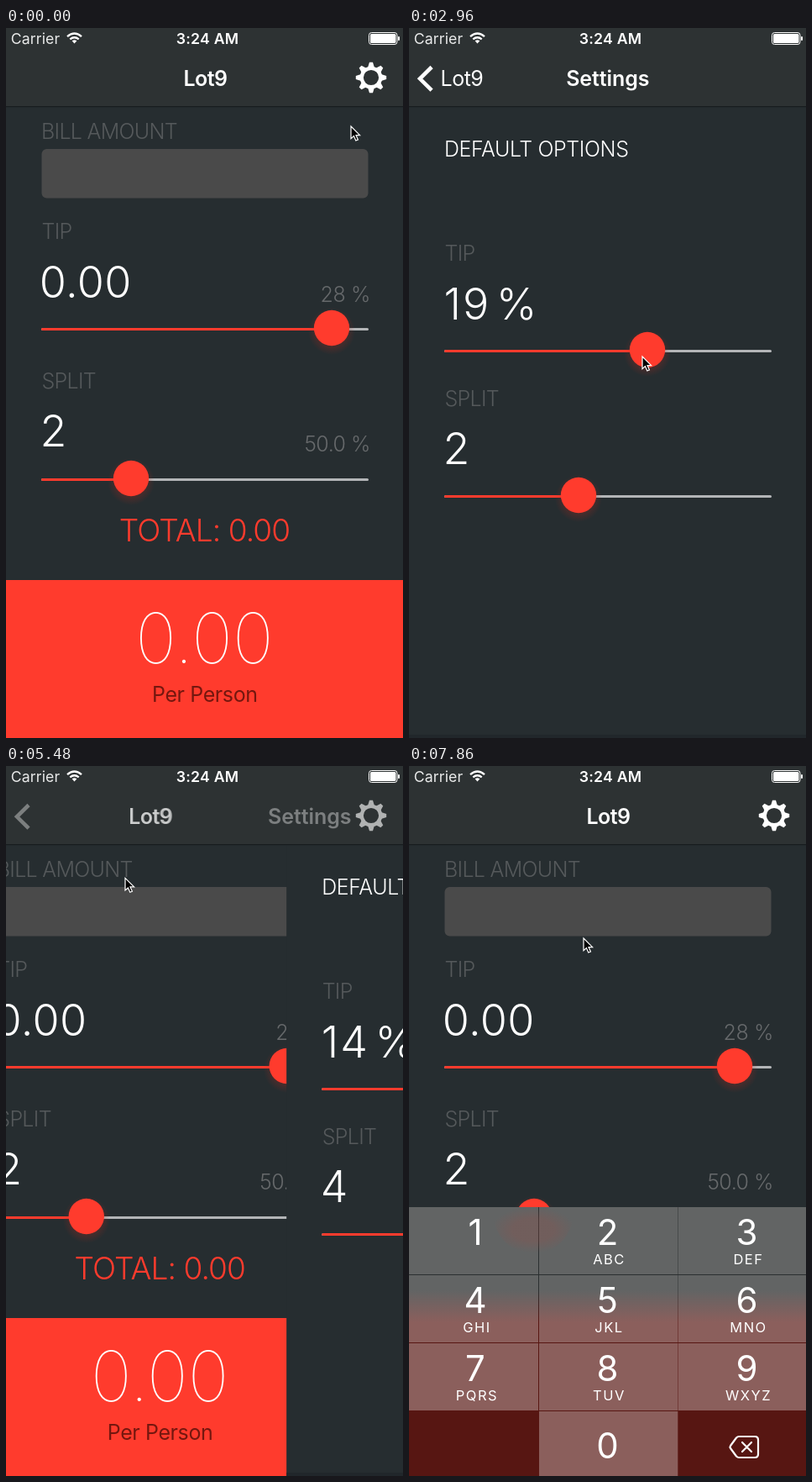
An HTML page for the animation above (8 s loop, 473 by 845 pixels).

```html
<!DOCTYPE html>
<html lang="en">
<head>
<meta charset="utf-8">
<title>Tip calculator</title>
<style>
  html, body { margin: 0; width: 100%; height: 100%; overflow: hidden; background: #262d30; }
  svg { display: block; width: 100%; height: 100%; }
  text { font-family: Inter, Roboto, sans-serif; white-space: pre; }
</style>
</head>
<body>
<svg id="stage" viewBox="0 0 473 845">
  <defs>
    <linearGradient id="key" gradientUnits="userSpaceOnUse" x1="0" y1="624" x2="0" y2="662">
      <stop offset="0" stop-color="#626464"/><stop offset="1" stop-color="#8b5f5c"/>
    </linearGradient>
    <linearGradient id="gap" gradientUnits="userSpaceOnUse" x1="0" y1="624" x2="0" y2="662">
      <stop offset="0" stop-color="#2b2f30"/><stop offset="1" stop-color="#571612"/>
    </linearGradient>
    <radialGradient id="glow">
      <stop offset=".5" stop-color="#a04a42" stop-opacity=".24"/><stop offset="1" stop-color="#a04a42" stop-opacity="0"/>
    </radialGradient>
    <radialGradient id="shade">
      <stop offset=".6" stop-color="#a02a20" stop-opacity=".32"/><stop offset="1" stop-color="#a02a20" stop-opacity="0"/>
    </radialGradient>
  </defs>
  <g id="main"></g>
  <g id="settings"></g>
  <g id="keyboard"></g>
  <g id="nav"></g>
  <path id="cursor" d="M0 0V14.6L3.4 11.6L5.8 17L8.4 15.9L6 10.6H10.6Z" fill="#000" stroke="#fff" stroke-width="1.2"/>
</svg>
<script>
const LOOP = 8000, TICK = 148.3, W = 473;
const RED = '#ff3b2d', BG = '#262d30', GREY = '#55595b', VALUE = '#66696b', WHITE = '#fff';
const byId = id => document.getElementById(id);
const [main, settings, keyboard, nav] = ['main', 'settings', 'keyboard', 'nav'].map(byId);

function add(parent, tag, attrs, content) {
  const el = document.createElementNS('http://www.w3.org/2000/svg', tag);
  for (const name in attrs) el.setAttribute(name, attrs[name]);
  if (content) el.textContent = content;
  return parent.appendChild(el);
}
const rect = (g, x, y, width, height, fill, rx = 0) => add(g, 'rect', { x, y, width, height, fill, rx });
const label = (g, str, x, y, size, weight, fill, space = 0, anchor = 'start') => add(g, 'text', {
  x, y, fill, 'font-size': size, 'font-weight': weight, 'letter-spacing': space, 'text-anchor': anchor
}, str);
const shift = (el, x, y = 0) => el.setAttribute('transform', `translate(${x} ${y})`);

function slider(g, y, x) {
  rect(g, 42, y, 390, 3, '#b3b5b7', 1.5);
  const bar = rect(g, 42, y, 0, 3, RED, 1.5);
  const knob = add(g, 'g', {});
  add(knob, 'circle', { cy: 4, r: 28, fill: 'url(#shade)' });
  add(knob, 'circle', { r: 21.2, fill: RED });
  const set = pos => {
    bar.setAttribute('width', pos - 42);
    shift(knob, pos, y);
  };
  set(x);
  return set;
}

// Main screen
rect(main, 0, 94, W, 751, BG);
label(main, 'BILL AMOUNT', 42, 132, 25, 300, GREY, -.7);
rect(main, 42.5, 144, 389, 58.5, '#4a4a4a', 6);
const caret = rect(main, 53, 147, 2, 53, '#f03a2e');
label(main, 'TIP', 42.5, 251, 25, 300, GREY, -.7);
label(main, '0.00', 39.8, 320.5, 52, 300, WHITE, .4);
label(main, '28 %', 434, 326, 25, 300, VALUE, -.4, 'end');
slider(main, 357, 388);
label(main, 'SPLIT', 42.5, 429, 25, 300, GREY, -.7);
label(main, '2', 40.5, 498, 52, 300, WHITE);
label(main, '50.0 %', 434, 504, 25, 300, VALUE, -.5, 'end');
slider(main, 536, 149);
label(main, 'TOTAL: 0.00', 236.5, 611, 37, 300, RED, -.9, 'middle');
rect(main, 0, 657, W, 188, RED);
label(main, '0.00', 236.3, 756, 83, 100, WHITE, -.2, 'middle');
label(main, 'Per Person', 236.8, 802, 25, 400, '#74170f', -.4, 'middle');

// Settings screen
rect(settings, 0, 94, W, 751, BG);
rect(settings, 0, 841, W, 4, '#21272b');
label(settings, 'DEFAULT OPTIONS', 42, 153, 25, 300, WHITE, -.4);
label(settings, 'TIP', 42.5, 277, 25, 300, GREY, -.7);
const tipText = label(settings, '', 41.5, 346.5, 52, 300, WHITE, 2);
tipText.setAttribute('word-spacing', -10);
const setTip = slider(settings, 383, 388);
label(settings, 'SPLIT', 42.5, 450, 25, 300, GREY, -.7);
const splitText = label(settings, '', 40.5, 519, 52, 300, WHITE);
const setSplit = slider(settings, 556, 202);

// Keyboard
rect(keyboard, 0, 525, W, 320, 'url(#gap)');
const cols = [[0, 154, 79], [155, 165.3, 236.5], [320.7, 152.3, 402.5]];
const letters = ['', 'ABC', 'DEF', 'GHI', 'JKL', 'MNO', 'PQRS', 'TUV', 'WXYZ'];
letters.forEach((str, i) => {
  const [x, w, mid] = cols[i % 3], y = 525 + 81 * Math.floor(i / 3);
  rect(keyboard, x, y, w, 80, 'url(#key)');
  label(keyboard, String(i + 1), mid, y + 45, 42, 400, WHITE, 0, 'middle');
  label(keyboard, str, mid + 2, y + 68, 16.5, 400, WHITE, 1.5, 'middle');
});
rect(keyboard, 155, 768, 165.3, 77, 'url(#key)');
label(keyboard, '0', 236.5, 824, 42, 400, WHITE, 0, 'middle');
add(keyboard, 'path', {
  d: 'M393 798H412Q416 798 416 802V819Q416 823 412 823H393Q391.500 823 390 821.500L383 812Q382 810.500 383 809L390 799.500Q391.500 798 393 798ZM397 805L408 816M408 805L397 816',
  fill: 'none', stroke: WHITE, 'stroke-width': 2.2, 'stroke-linecap': 'round', 'stroke-linejoin': 'round'
});
const glow = add(keyboard, 'path', { d: 'M98 525H198Q192 579 148 579Q104 579 98 525Z', fill: 'url(#glow)' });

// Status and navigation bars
rect(nav, 0, 0, W, 93, '#2d3233');
rect(nav, 0, 93, W, 1.2, '#171c1e');
label(nav, 'Carrier', 5.7, 19, 17.7, 400, '#e9eaea', .1);
label(nav, '3:24 AM', 240, 19, 17.7, 600, WHITE, .2, 'middle');
const wifi = { fill: 'none', stroke: WHITE, 'stroke-width': 2.3 };
add(nav, 'path', { d: 'M73 10.200Q81.500 2.800 90 10.200M76.300 13.400Q81.500 9.200 86.700 13.400', ...wifi });
add(nav, 'path', { d: 'M78.600 15.300Q81.500 13 84.400 15.300L81.500 18.500Z', fill: WHITE });
add(nav, 'rect', { x: 432.5, y: 5.5, width: 33.5, height: 14, rx: 3, fill: 'none', stroke: WHITE });
rect(nav, 434, 7, 30.5, 11, WHITE, 1.5);
rect(nav, 467, 10, 2, 5, WHITE, 1);

const title = label(nav, 'Lot9', 237.5, 69, 25, 600, WHITE, -.5, 'middle');
const heading = label(nav, 'Settings', 236.8, 69, 25, 600, WHITE, -.05, 'middle');
const back = label(nav, 'Lot9', 37.5, 69, 25, 400, WHITE, -.5);
const chevron = add(nav, 'path', { d: 'M27 46.500L13 60.300L27 74.200', fill: 'none', stroke: WHITE, 'stroke-width': 4.6 });
const gear = add(nav, 'g', { transform: 'translate(435 59)' });
add(gear, 'circle', { r: 11.2, fill: 'none', stroke: WHITE, 'stroke-width': 4.2 });
for (let a = 0; a < 360; a += 45)
  add(gear, 'path', { d: 'M-3.900 -12L-2 -18.200H2L3.900 -12Z', fill: WHITE, transform: `rotate(${a})` });

// Keys are [tick, ...values], joined linearly
function track(keys, k) {
  const i = keys.findIndex(key => key[0] > k);
  if (i < 0) return keys[keys.length - 1].slice(1);
  if (i === 0) return keys[0].slice(1);
  const a = keys[i - 1], b = keys[i], f = (k - a[0]) / (b[0] - a[0]);
  return a.slice(1).map((v, j) => v + (b[j + 1] - v) * f);
}
const spring = x => x <= 0 ? 0 : x > 3.9 ? 1 : 1 - (1 + 2.47 * x) * Math.exp(-2.47 * x);

const tipKeys = [[16, 388], [20, 284], [22, 227]];
const splitKeys = [[24, 202], [31, 331]];
const cursorKeys = [
  [0, 411, 117], [8, 439, 61], [13, 439, 61], [16, 382, 391], [20, 278, 391], [22, 221, 391],
  [24, 207, 549], [25, 225, 557], [31, 336, 557], [32, 336, 557], [35, 45, 62], [36, 45, 62],
  [39, 336, 276], [40, 334, 268], [42, 305, 168], [44, 297, 231], [48, 297, 231], [53, 208, 205]
];

function draw(ms) {
  const k = Math.min(53, Math.floor((ms + 20) / TICK));
  const push = spring(k - 9.98) - spring(k - 36);
  const slide = Math.pow(Math.max(0, push), .8);
  const bar = k >= 39 ? 0 : slide;

  shift(main, -.3 * W * slide);
  shift(settings, W * (1 - push));
  settings.setAttribute('visibility', push > 0 ? 'visible' : 'hidden');

  shift(title, -173.5 * bar);
  title.setAttribute('opacity', 1 - bar);
  shift(heading, 200 * (1 - bar));
  heading.setAttribute('opacity', bar);
  shift(back, 173.5 * (1 - bar));
  back.setAttribute('opacity', bar);
  chevron.setAttribute('opacity', bar);
  gear.setAttribute('opacity', (k >= 9 && k < 20 ? .24 : 1) * (1 - bar));

  const [tip] = track(tipKeys, k), [split] = track(splitKeys, k);
  setTip(tip);
  setSplit(split);
  tipText.textContent = Math.floor((tip - 63) / 11.57) + ' %';
  splitText.textContent = Math.floor(1 + (split - 63) / 86.75);

  const drop = k < 48 ? 320 : k < 49 ? 129 : 0;
  shift(keyboard, 0, drop);
  for (const id of ['key', 'gap']) byId(id).setAttribute('gradientTransform', `translate(0 ${-drop})`);
  glow.setAttribute('visibility', drop ? 'hidden' : 'visible');
  caret.setAttribute('visibility', k >= 48 && k < 51 ? 'visible' : 'hidden');

  shift(byId('cursor'), ...track(cursorKeys, k));
}

const start = performance.now();
function frame() {
  draw((performance.now() - start) % LOOP);
  requestAnimationFrame(frame);
}
frame();
</script>
</body>
</html>
```
